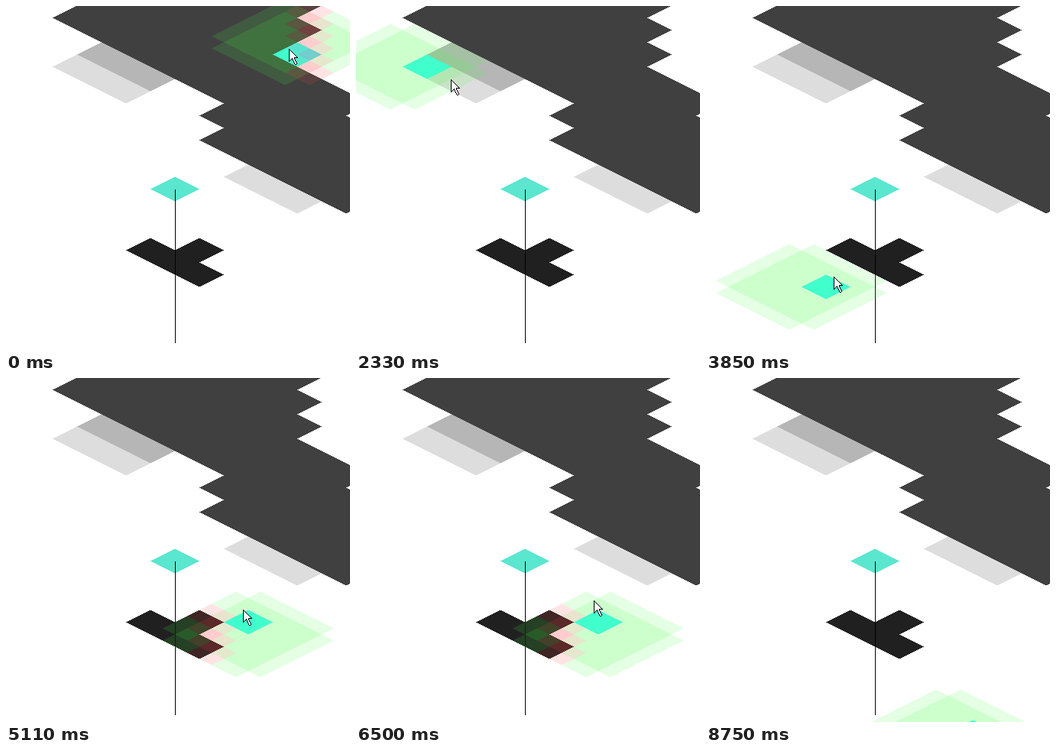
These frames come from a looping animation (450x450 px, 8.85 s). An HTML page with a canvas:

```html
<!DOCTYPE html>
<html lang="en">
<head>
<meta charset="utf-8">
<title>Isometric tiles</title>
<style>
html, body { margin: 0; width: 100%; height: 100%; overflow: hidden; background: #fff; }
canvas { display: block; }
</style>
</head>
<body>
<canvas id="stage" width="450" height="450"></canvas>
<script>
const ctx = document.getElementById('stage').getContext('2d');
const LOOP = 8850, STEP = 135;
const OX = 221, OY = 239; // centre of tile 0,0
const GREEN = 'rgba(64,255,64,.14)', RED = 'rgba(255,64,64,.14)';

// Pointer poses, one per step of straight moves; it rests between bursts
const poses = [{ t: 0, x: 370, y: 56 }];

function burst(start, ...legs) {
  let t = start;
  for (const [steps, x, y] of legs) {
    const from = poses[poses.length - 1];
    for (let k = 1; k <= steps; k++, t += STEP) {
      poses.push({
        t,
        x: Math.round(from.x + (x - from.x) * k / steps),
        y: Math.round(from.y + (y - from.y) * k / steps)
      });
    }
  }
}

burst(130, [3, 310, 30], [5, 142, 32]);
burst(1190, [2, 114, 33]);
burst(1650, [4, 66, 54], [2, 124, 96], [2, 190, 66]);
burst(2850, [7, 164, 355], [1, 167, 354]);
burst(3970, [4, 240, 394], [3, 308, 320], [1, 308, 312]);
burst(5110, [1, 310, 303], [1, 300, 264], [2, 254, 290], [1, 250, 286]);
burst(5930, [2, 300, 385], [2, 312, 318], [1, 311, 291], [1, 200, 265], [1, 195, 262]);
burst(7070, [2, 317, 380], [1, 273, 309], [3, 255, 232], [1, 253, 230]);
burst(8190, [2, 380, 340], [2, 349, 460], [1, 349, 485]);

const within = (v, min, max) => v >= min && v <= max;

// Grey level of a tile, 255 for open floor
function shade(i, j) {
  if ((j === 3 && within(i, 2, 4)) || (j === 2 && i === 3)) return 32;
  if (j === -4 && within(i, -7, -5)) return 182;
  if ((j === -3 && within(i, -7, -5)) || (j === -2 && within(i, 1, 3))) return 221;
  const left = j <= -5 ? -9 : j + 2;
  const right = j < -7 ? j + 5 : within(j, -6, -4) ? j + 9 : j + 7;
  return j <= -3 && within(i, left, right) ? 64 : 255;
}

function diamond(i, j, color) {
  const x = OX + 32 * (i - j), y = OY + 16 * (i + j);
  ctx.fillStyle = color;
  for (let d = -15; d <= 15; d++) {
    const w = 32 - 2 * Math.abs(d);
    ctx.fillRect(x - w, y + d, 2 * w, 1);
  }
}

// Marker between two neighbours, red where the step is too high
function link(i, j, di, dj) {
  const blocked = Math.abs(shade(i, j) - shade(i + di, j + dj)) > 100;
  diamond(i + di / 2, j + dj / 2, blocked ? RED : GREEN);
}

function drawHover({ x, y }) {
  const u = (x - OX) / 32, v = (y + 4 - OY) / 16;
  const i = Math.round((u + v) / 2), j = Math.round((v - u) / 2);
  diamond(i, j, 'rgb(64,255,255)');

  // Links among the 4 by 4 tiles around the 2 by 2 cell
  const i0 = 2 * Math.floor(i / 2) - 1;
  const j0 = 2 * Math.floor((j - 1) / 2);
  for (let a = 0; a < 4; a++) {
    for (let b = 0; b < 4; b++) {
      if (a < 3) link(i0 + a, j0 + b, 1, 0);
      if (b < 3) link(i0 + a, j0 + b, 0, 1);
    }
  }
}

function drawPointer({ x, y }) {
  const bar = (left, right, row, color) => {
    ctx.fillStyle = color;
    ctx.fillRect(x + left, y + row, right - left + 1, 1);
  };
  for (let r = 0; r <= 16; r++) {
    const edge = r < 12 ? r : 16 - r;
    bar(0, edge, r, '#000');
    if (edge > 1) bar(1, r === 11 ? 6 : edge - 1, r, '#fff');
  }
  for (let r = 12; r < 20; r++) {
    const left = 4 + Math.floor((r - 12) / 2);
    bar(left, left + 3, r, '#000');
    bar(left + 1, left + 2, r, '#fff');
  }
  bar(8, 9, 20, '#000');
}

function draw(t) {
  ctx.fillStyle = '#fff';
  ctx.fillRect(0, 0, 450, 450);
  for (let i = -16; i <= 16; i++) {
    for (let j = -16; j <= 16; j++) {
      const g = shade(i, j);
      if (g < 255) diamond(i, j, `rgb(${g},${g},${g})`);
    }
  }
  diamond(0, 0, '#5ae6cf');
  ctx.fillStyle = '#000';
  ctx.fillRect(OX, OY + 1, 1, 201);

  let n = 0;
  while (n + 1 < poses.length && poses[n + 1].t <= t + 5) n++;
  drawHover(poses[Math.max(0, n - 1)]); // trails the pointer by one step
  drawPointer(poses[n]);
}

const start = performance.now();
function tick() {
  draw((performance.now() - start) % LOOP);
  requestAnimationFrame(tick);
}
tick();
</script>
</body>
</html>
```
